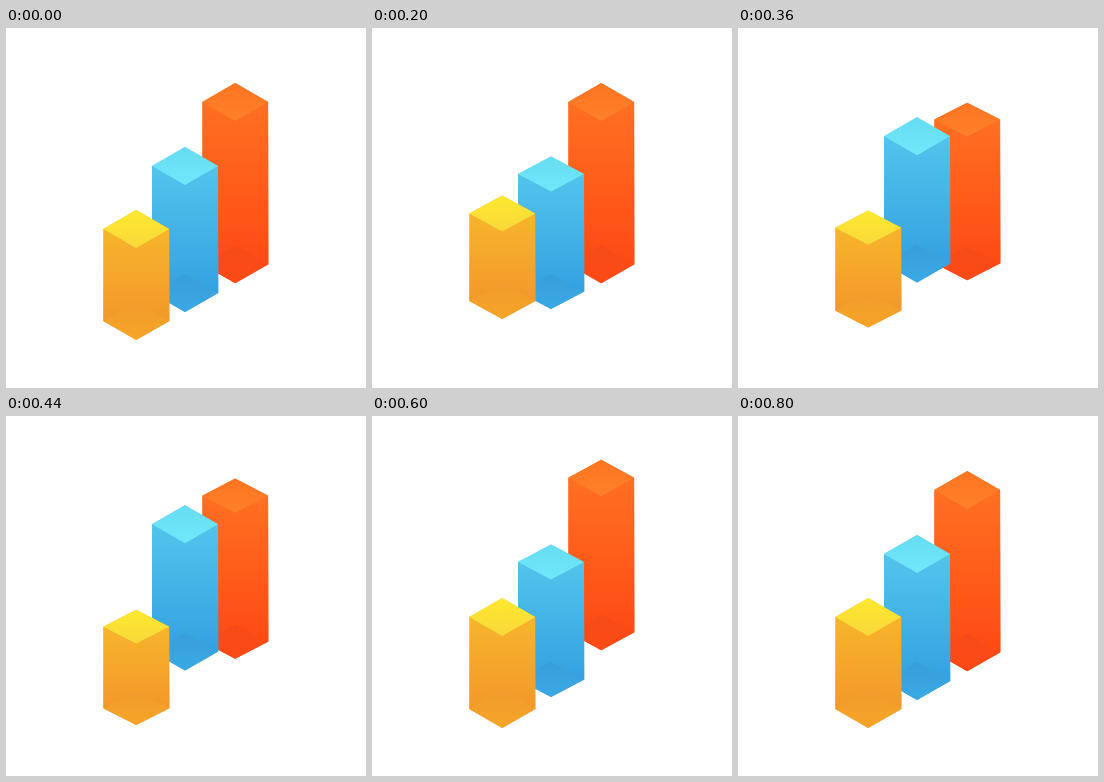
Animation of 360x360 px, one loop 1.6 s. Source, as an HTML page:

```html
<!DOCTYPE html>
<html lang="en">
<head>
<meta charset="utf-8">
<title>Jumping bars</title>
<style>
  html, body { margin: 0; width: 100%; height: 100%; overflow: hidden; background: #fff; }
  svg { display: block; width: 100%; height: 100%; }
</style>
</head>
<body>
<svg id="stage" viewBox="0 0 360 360"></svg>
<script>
const LOOP = 1600, STEP = 40;
const HALF_W = 33, HALF_H = 19;
const SQUASH = 0.848, STRETCH = 1.054, LIFT = 39.4;
const stage = document.getElementById('stage');

// Back to front; pivot is the height that stays put while a bar is squashed.
const bars = [
  { x: 229.2, top: 55, bottom: 255.3, pivot: 228, delay: 8,
    lid: ['#ff7521', '#ff8029'], side: ['#ff7424', '#ff4612'], base: ['#f54b18', '#ff4a16'] },
  { x: 179, top: 119, bottom: 284, pivot: 244, delay: 4,
    lid: ['#66dcf2', '#70e8fa'], side: ['#58c9ee', '#2f9cdf'], base: ['#379edb', '#3aa9e5'] },
  { x: 130.2, top: 182, bottom: 312, pivot: 286, delay: 0,
    lid: ['#fde92f', '#f9d83a'], side: ['#f8bb2b', '#f2922a'], base: ['#f19c2e', '#f6a526'] }
];

function add(parent, name, attrs) {
  const el = document.createElementNS('http://www.w3.org/2000/svg', name);
  for (const key in attrs) el.setAttribute(key, attrs[key]);
  return parent.appendChild(el);
}

function gradient(id, [from, to]) {
  const g = add(stage, 'linearGradient', { id, x1: 0, y1: 0, x2: 0, y2: 1 });
  add(g, 'stop', { offset: 0, 'stop-color': from });
  add(g, 'stop', { offset: 1, 'stop-color': to });
  return `url(#${id})`;
}

const diamond = (x, y) =>
  `M${x} ${y - HALF_H}L${x + HALF_W} ${y}L${x} ${y + HALF_H}L${x - HALF_W} ${y}Z`;

bars.forEach((bar, i) => {
  const { x, top, bottom } = bar;
  const left = x - HALF_W, right = x + HALF_W;
  const lidY = top + HALF_H, baseY = bottom - HALF_H;
  bar.node = add(stage, 'g', {});
  add(bar.node, 'path', {
    d: `M${x} ${top}L${right} ${lidY}L${right + 0.4} ${baseY}L${x} ${bottom}L${left} ${baseY}V${lidY}Z`,
    fill: gradient('side' + i, bar.side)
  });
  add(bar.node, 'path', { d: diamond(x, baseY), fill: gradient('base' + i, bar.base) });
  add(bar.node, 'path', { d: diamond(x, lidY), fill: gradient('lid' + i, bar.lid) });
});

const mix = (a, b, u) => a + (b - a) * u;

// Sixteen beats: crouch, rise, fall, recover, four linear beats each.
function pose(beat) {
  const dist = Math.abs(Math.min(16, Math.max(0, beat)) - 8);
  if (dist > 4) return { scale: mix(SQUASH, 1, (dist - 4) / 4), lift: 0 };
  const u = 1 - dist / 4;
  return { scale: mix(SQUASH, STRETCH, u), lift: LIFT * u };
}

function draw(time) {
  // Beats run a little faster than the display steps, so a few are skipped.
  const step = Math.floor((time % LOOP) / STEP);
  const beat = Math.floor(step * 1.203 + 0.38);
  for (const bar of bars) {
    const { scale, lift } = pose(beat - bar.delay);
    const y = bar.pivot * (1 - scale) - lift;
    bar.node.setAttribute('transform', `matrix(1 0 0 ${scale} 0 ${y})`);
  }
}

function tick() {
  draw(performance.now());
  requestAnimationFrame(tick);
}
tick();
</script>
</body>
</html>
```
